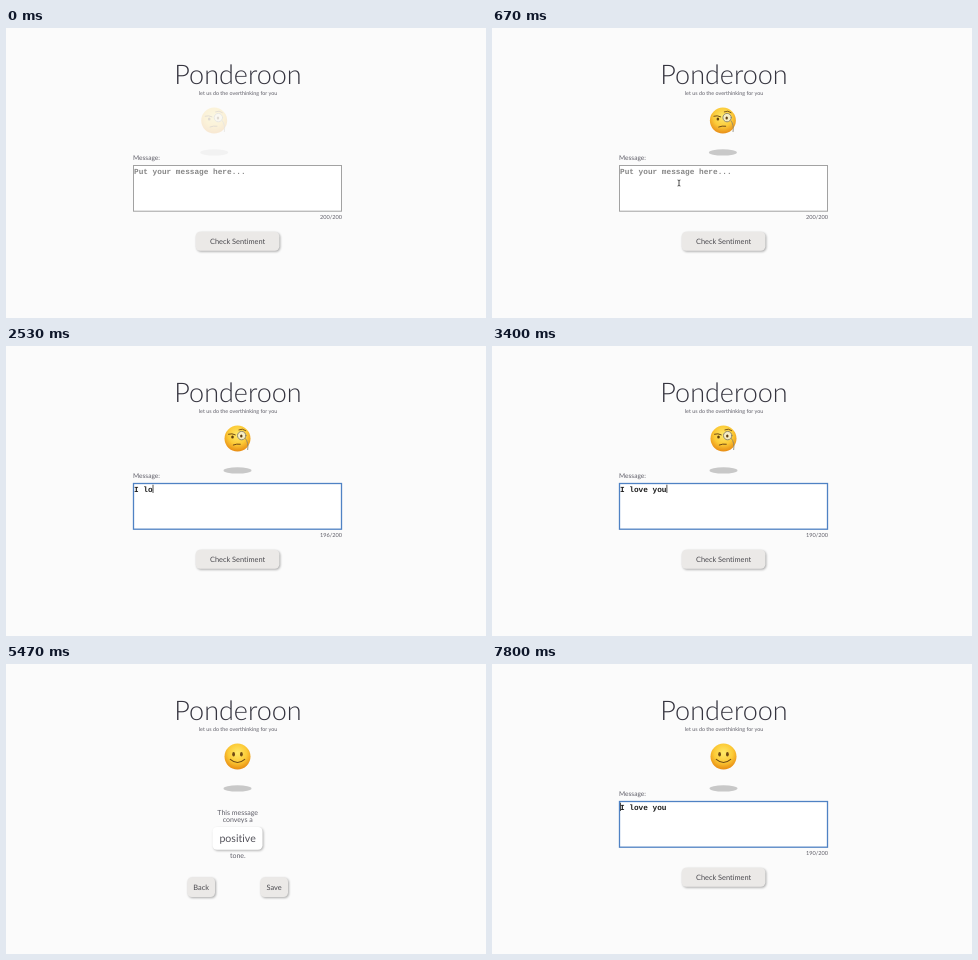
Recreate the animation shown at these times as an HTML page. Size 480 px wide and 290 px high, loop 8 s.

```html
<!DOCTYPE html>
<html lang="en">
<head>
<meta charset="utf-8">
<title>Ponderoon</title>
<style>
  html, body { margin: 0; width: 100%; height: 100%; overflow: hidden; background: #fbfbfb; }
  svg { display: block; width: 480px; height: 290px; }
  text { font-family: Lato, "Open Sans", sans-serif; font-variant-ligatures: none; fill: #5f5e68; text-rendering: geometricPrecision; }
  .mid { text-anchor: middle; }
  .end { text-anchor: end; }
  .title { font-size: 27px; font-weight: 300; fill: #35343f; }
  .tag { font-size: 5.4px; }
  .label { font-size: 6.6px; }
  .count { font-size: 5.6px; }
  .result { font-size: 7px; }
  .btn text { font-size: 7.4px; fill: #4c4b50; }
  .tone { font-size: 10.6px; fill: #55545c; }
  .mono { font: bold 7.75px "Liberation Mono", "Courier New", monospace; white-space: pre; }
  .btn rect { fill: #ebe9e7; filter: drop-shadow(1px 1.2px .8px rgba(0,0,0,.32)); }
  .btn.focus rect { stroke: #5c8bcb; stroke-width: 1; rx: 1px; }
  .btn.down rect { filter: drop-shadow(.4px .8px .6px rgba(0,0,0,.25)); }
  .card { fill: #fff; filter: drop-shadow(1px 1.2px 1px rgba(0,0,0,.3)); }
  #area { fill: #fff; stroke: #a2a2a2; stroke-width: 1; }
  #area.focus { stroke: #4f82c4; stroke-width: 1.3; }
</style>
</head>
<body>
<svg viewBox="0 0 480 290">
  <defs>
    <radialGradient id="skin" cx=".5" cy=".36" r=".66">
      <stop offset="0" stop-color="#ffea6a"/>
      <stop offset=".55" stop-color="#fcca36"/>
      <stop offset="1" stop-color="#e6860f"/>
    </radialGradient>
  </defs>

  <text class="title mid" x="232" y="55.5">Ponderoon</text>
  <text class="tag mid" x="232" y="67">let us do the overthinking for you</text>

  <g id="hero">
    <ellipse cx="231.5" cy="124.4" rx="14" ry="3.2" fill="#c8c8c8"/>
    <g fill="none" stroke="#704a14" stroke-linecap="round" transform="translate(231.5 92.6)">
      <circle r="13" fill="url(#skin)" stroke="none"/>
      <g id="monocle">
        <path d="M8 0Q11.2 4 10.2 11" stroke="#85806f" stroke-width=".8"/>
        <circle cx="4.2" cy="-3" r="4.2" fill="#f7eec4" stroke="#85806f" stroke-width=".9"/>
        <ellipse cx="3.8" cy="-2.6" rx="1.2" ry="1.6" fill="#5d3c0d" stroke="none"/>
        <ellipse cx="-5" cy="-1.6" rx="1.3" ry="1.6" fill="#5d3c0d" stroke="none"/>
        <path d="M-9-4.4Q-5.5-5.6-2.2-3.8" stroke-width="1"/>
        <path d="M1.4-8.8Q5-10.6 8.2-8" stroke-width=".9"/>
        <path d="M-4.2 6.4Q-.8 5 2.8 5.6" stroke-width="1"/>
      </g>
      <g id="smile">
        <ellipse cx="-3.9" cy="-2.4" rx="1.4" ry="2.2" fill="#704a14" stroke="none"/>
        <ellipse cx="3.9" cy="-2.4" rx="1.4" ry="2.2" fill="#704a14" stroke="none"/>
        <path d="M-7.2 2.8Q0 9 7.2 2.8" stroke-width="1.1"/>
      </g>
    </g>
  </g>

  <g id="form">
    <text class="label" x="127" y="132.2">Message:</text>
    <rect id="area" x="127.5" y="137.5" width="208" height="45.7"/>
    <text id="msg" class="mono" x="128" y="145.6"></text>
    <rect id="caret" y="138.7" width=".8" height="8.3" fill="#222"/>
    <text id="count" class="count end" x="336" y="191"></text>
    <g id="check" class="btn">
      <rect x="189.7" y="203.8" width="83.6" height="19" rx="4.5"/>
      <text class="mid" x="231.6" y="215.6">Check Sentiment</text>
    </g>
  </g>

  <g id="result">
    <text class="result mid" x="231.7" y="151">This message</text>
    <text class="result mid" x="231.7" y="158.2">conveys a</text>
    <rect class="card" x="206.5" y="163" width="50" height="22.7" rx="4.5"/>
    <text class="tone mid" x="231.6" y="177.8">positive</text>
    <text class="result mid" x="231.8" y="194.3">tone.</text>
    <g id="back" class="btn">
      <rect x="181.3" y="213.3" width="27.7" height="19.8" rx="4.5"/>
      <text class="mid" x="195.2" y="225.6">Back</text>
    </g>
    <g class="btn">
      <rect x="254.3" y="213.3" width="27.7" height="19.8" rx="4.5"/>
      <text class="mid" x="268.1" y="225.6">Save</text>
    </g>
  </g>

  <g id="pointer">
    <path id="arrow" d="M0 0V9.4L2.2 7.4L3.6 10.6L5 10L3.6 6.9H6.6Z" fill="#111" stroke="#fff" stroke-width=".6"/>
    <path id="beam" d="M-1.4-3Q0-3 0-2V2Q0 3-1.4 3M1.4-3Q0-3 0-2M0 2Q0 3 1.4 3" fill="none" stroke="#222" stroke-width=".8"/>
  </g>
</svg>
<script>
const LOOP = 8000;
const MESSAGE = "I love you";
const PLACEHOLDER = "Put your message here...";
const KEY_TIMES = [2000, 2130, 2330, 2530, 2670, 2800, 2930, 3130, 3270, 3400];
const CHAR_WIDTH = 4.65;

const el = {};
for (const node of document.querySelectorAll("svg [id]")) el[node.id] = node;

const clamp = x => Math.min(1, Math.max(0, x));
const within = (t, from, to) => t >= from && t < to;
const show = (node, on) => node.setAttribute("display", on ? "inline" : "none");

// Standard CSS "ease", solved by bisection.
function ease(x) {
  const curve = (s, a, b) => 3 * s * (1 - s) ** 2 * a + 3 * s * s * (1 - s) * b + s ** 3;
  let lo = 0, hi = 1;
  for (let i = 0; i < 20; i++) {
    const mid = (lo + hi) / 2;
    if (curve(mid, .25, .25) < x) lo = mid; else hi = mid;
  }
  return curve(hi, .1, 1);
}

function drawHero(t) {
  const p = ease(clamp((t + 140) / 1000));
  el.hero.setAttribute("transform", `translate(${-28 * (1 - p)} 0)`);
  el.hero.setAttribute("opacity", p);
  show(el.monocle, t < 4670);
  show(el.smile, t >= 4670);
}

function drawForm(t) {
  const typed = KEY_TIMES.filter(k => k <= t).length;
  const focused = within(t, 800, 3730) || t >= 7800;
  el.msg.textContent = typed ? MESSAGE.slice(0, typed) : PLACEHOLDER;
  el.msg.style.fill = typed ? "#1c1c1c" : "#868686";
  el.count.textContent = `${200 - typed}/200`;
  el.area.classList.toggle("focus", focused);
  const caretAt = t >= 7800 ? 0 : typed;
  el.caret.setAttribute("x", 128 + caretAt * CHAR_WIDTH);
  show(el.caret, focused && !within(t, 1330, 1870));
  el.check.classList.toggle("focus", within(t, 3730, 4670));
  el.check.classList.toggle("down", within(t, 4200, 4670));
  show(el.form, !within(t, 4670, 7070));
}

function drawResult(t) {
  show(el.result, within(t, 4670, 7070));
  el.result.setAttribute("opacity", ease(clamp((t - 4600) / 730)));
  el.back.classList.toggle("focus", t >= 6270);
  el.back.classList.toggle("down", t >= 6670);
}

function drawPointer(t) {
  const p = ease(clamp((t - 70) / 560));
  const x = 14 + 173 * p, y = 198 - 43 * p;
  const inside = x > 127 && y < 183;
  el.pointer.setAttribute("transform", `translate(${x} ${y})`);
  show(el.pointer, within(t, 70, 2000));
  show(el.arrow, !inside);
  show(el.beam, inside);
}

function draw(t) {
  drawHero(t);
  drawForm(t);
  drawResult(t);
  drawPointer(t);
}

const start = performance.now();
function tick() {
  draw((performance.now() - start) % LOOP);
  requestAnimationFrame(tick);
}
tick();
</script>
</body>
</html>
```
